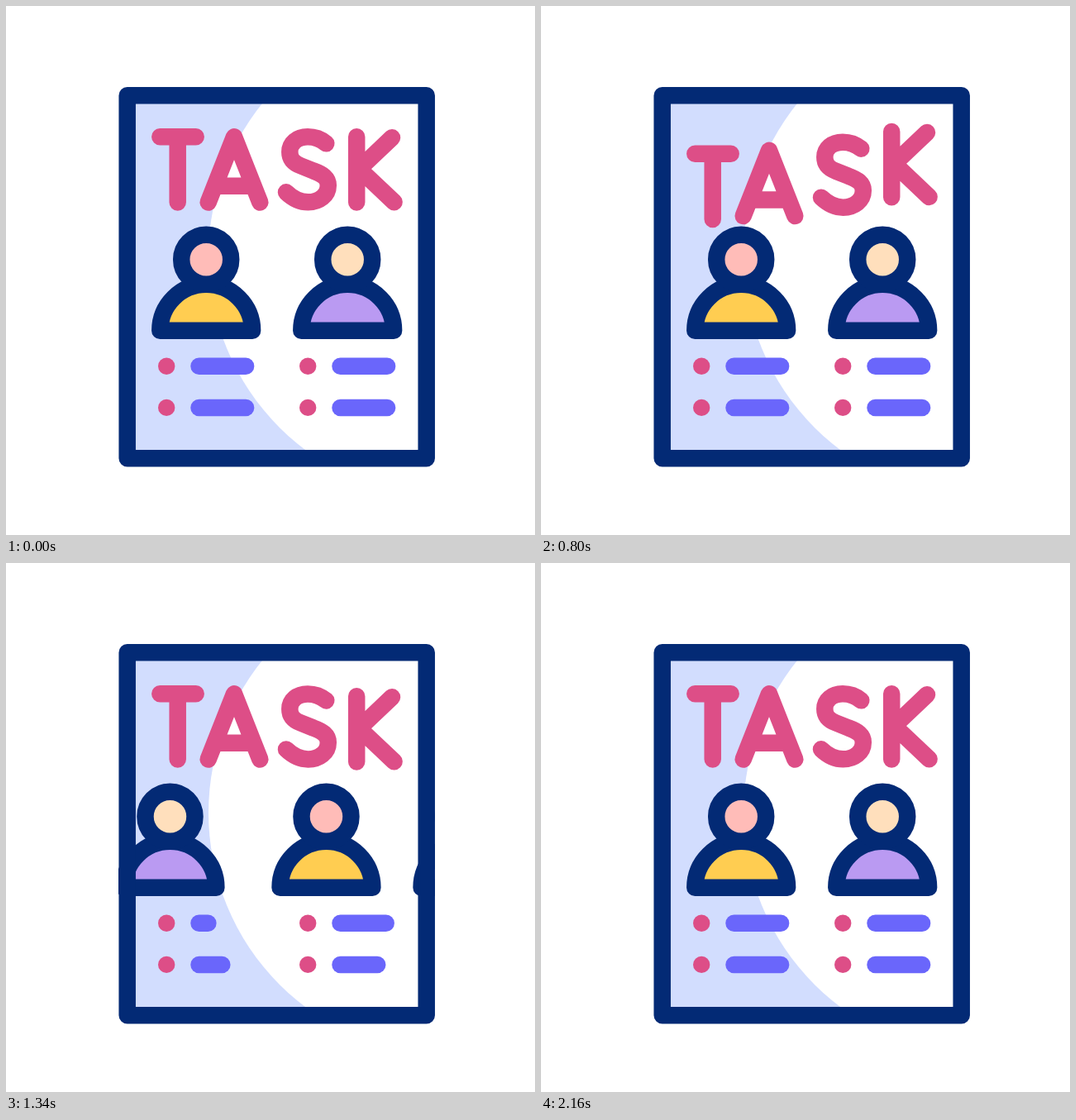
Animation, 640 px wide and 640 px high, one loop 2220 ms. Source, as an HTML page with a canvas:

```html
<!DOCTYPE html>
<html lang="en">
<head>
<meta charset="utf-8">
<title>Task board</title>
<style>
  html, body { margin: 0; width: 100%; height: 100%; overflow: hidden; background: #fff; }
  canvas { display: block; width: 640px; height: 640px; }
</style>
</head>
<body>
<canvas id="stage" width="640" height="640"></canvas>
<script>
const ctx = document.getElementById('stage').getContext('2d');
const LOOP = 2220, STEP = 20, LINE = 20.5;
const NAVY = '#032a75', PINK = '#dd4e87', VIOLET = '#6a66fb', PALE = '#d2ddfe';

const LETTERS = [
  'M186.3 158.3H229.7M207.7 158.3V237.5',
  'M244.7 237.5L276 158.3L307.3 237.5M252.5 217.8H299.5',
  'M387.3 166.3C381 161 373 158.3 365 158.3C352 158.3 343.3 166 343.3 176.5' +
    'C343.3 186 349 190.5 357 193.5L372 199.5C383 203.5 389.8 208 389.8 217' +
    'C389.8 229 379 237.3 365.5 237.3C355 237.3 346.5 232.5 339 225.3',
  'M424.2 158.3V237.5M467 159.3L427.2 197.1L469.6 237.3'
].map(d => new Path2D(d));

// Bars in the order in which they shrink
const BARS = [[233.5, 435.7], [233.5, 485.9], [404.5, 485.9], [404.5, 435.7]];
const BAR = 56.6;

const PEOPLE = [
  { x: 242.2, skin: '#ffbcb8', shirt: '#ffcd51' },
  { x: 413.2, skin: '#ffdfbc', shirt: '#ba9af2' }
];
const SPAN = 360;

const ease = u => (1 - Math.cos(Math.PI * u)) / 2;

// Eased value at time t along keys of [time, value]
function track(t, keys) {
  if (t <= keys[0][0]) return keys[0][1];
  for (let i = 1; i < keys.length; i++) {
    const [t0, v0] = keys[i - 1], [t1, v1] = keys[i];
    if (t < t1) return v0 + (v1 - v0) * ease((t - t0) / (t1 - t0));
  }
  return keys[keys.length - 1][1];
}

const letterY = t => track(t, [[0, 0], [400, -20.5], [800, 20.5], [1200, 0]]);
const barLength = t => track(t, [[1200, BAR], [1400, -1], [1800, BAR * 1.22], [2040, BAR]]);
const slide = t => track(t, [[1040, 0], [1140, -20], [1590, SPAN + 20], [1640, SPAN]]);

function disc(x, y, r, color) {
  ctx.fillStyle = color;
  ctx.beginPath();
  ctx.arc(x, y, r, 0, Math.PI * 2);
  ctx.fill();
}

function person(x, { skin, shirt }) {
  ctx.strokeStyle = NAVY;
  ctx.fillStyle = shirt;
  ctx.beginPath();
  ctx.arc(x, 392.7, 55.9, Math.PI, 0);
  ctx.closePath();
  ctx.fill();
  ctx.stroke();
  disc(x, 306.7, 30, skin);
  ctx.stroke();
}

function drawPage() {
  ctx.fillStyle = '#fff';
  ctx.fillRect(0, 0, 640, 640);
  ctx.save();
  ctx.beginPath();
  ctx.rect(147, 108, 361, 439);
  ctx.clip();
  ctx.fillStyle = PALE;
  ctx.fillRect(147, 108, 361, 439);
  disc(539, 302.3, 294, '#fff');
  ctx.restore();
  // The pale side ends before the disc curves back
}

function drawLetters(t) {
  ctx.strokeStyle = PINK;
  LETTERS.forEach((path, i) => {
    ctx.save();
    ctx.translate(0, letterY(t - i * 80));
    ctx.stroke(path);
    ctx.restore();
  });
}

function drawBars(t) {
  BARS.forEach(([x, y], i) => {
    disc(x - 39.3, y, 10.2, PINK);
    ctx.strokeStyle = VIOLET;
    ctx.beginPath();
    ctx.moveTo(x, y);
    ctx.lineTo(x + barLength(t - i * 40), y);
    ctx.stroke();
  });
}

function drawPeople(t) {
  const shift = slide(t);
  ctx.save();
  ctx.beginPath();
  ctx.rect(136, 118, 383, 420);
  ctx.clip();
  for (let k = -2; k <= 1; k++) {
    for (const p of PEOPLE) {
      const x = p.x + shift + k * SPAN;
      if (x > 70 && x < 586) person(x, p);
    }
  }
  ctx.restore();
}

function drawFrame() {
  ctx.strokeStyle = NAVY;
  ctx.strokeRect(146.7, 108.3, 362, 439);
}

function draw(t) {
  ctx.lineWidth = LINE;
  ctx.lineCap = ctx.lineJoin = 'round';
  drawPage();
  drawLetters(t);
  drawBars(t);
  drawPeople(t);
  drawFrame();
}

const start = performance.now();
function tick() {
  const t = (performance.now() - start) % LOOP;
  draw(Math.floor(t / STEP) * STEP);
  requestAnimationFrame(tick);
}
tick();
</script>
</body>
</html>
```
